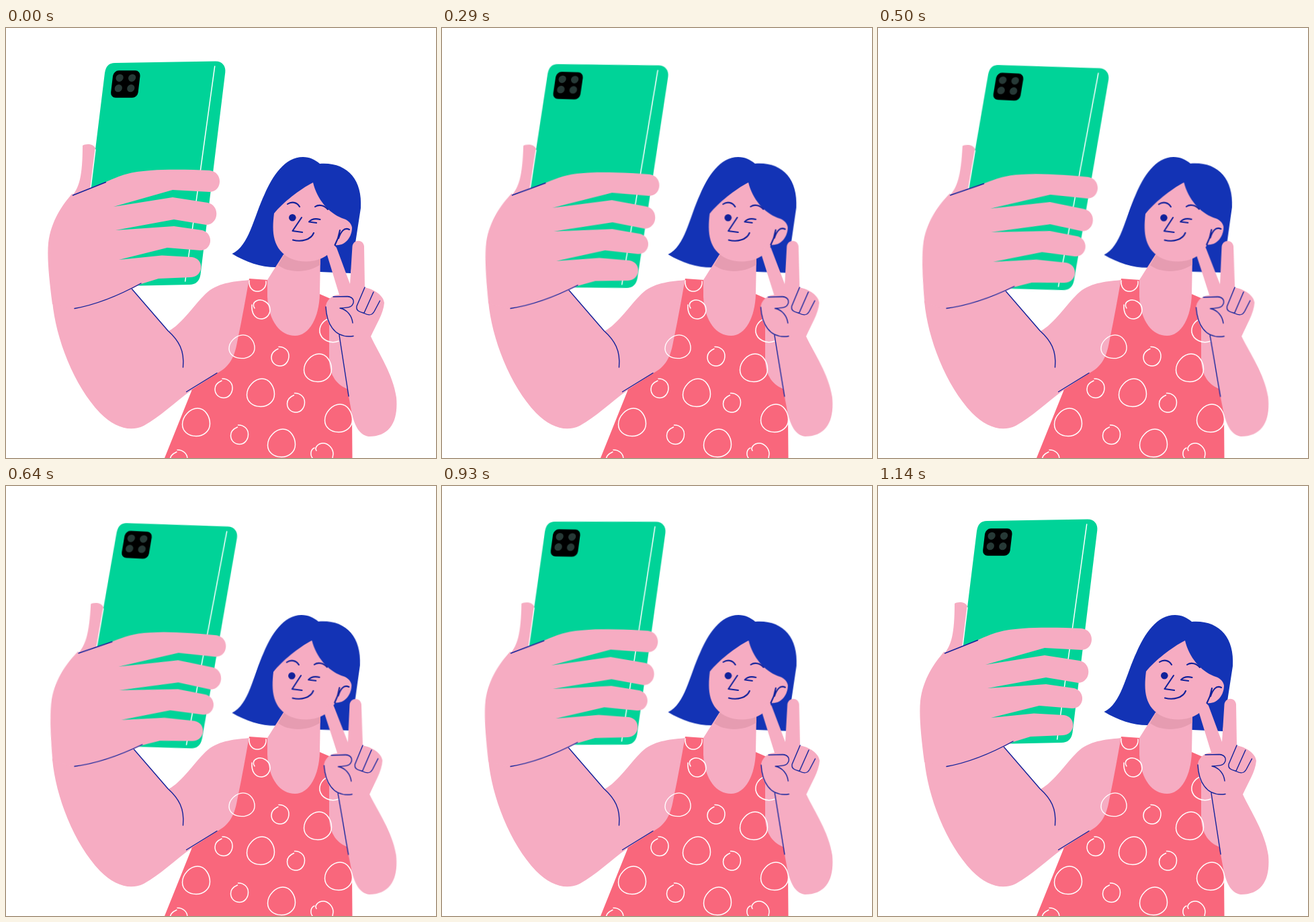
An HTML page that plays this animation: 640 by 640 pixels, repeating every 1210 ms.

```html
<!DOCTYPE html>
<html lang="en">
<head>
<meta charset="utf-8">
<title>Selfie</title>
<style>
  html, body { margin: 0; width: 100%; height: 100%; overflow: hidden; background: #fff; }
  svg { display: block; width: 100vw; height: 100vh; }
  .skin { fill: #f6acc2; }
  .hair { fill: #1333b5; }
  .dress { fill: #f9677c; }
  .green { fill: #00d398; }
  .line { fill: none; stroke: #11219a; stroke-width: 1.4; stroke-linecap: round; stroke-linejoin: round; }
  .bold { stroke-width: 2.1; }
  .white { fill: none; stroke: #fff; stroke-width: 1.5; stroke-linecap: round; }
  .grip { transform-origin: 107px 417px; }
  .head { transform-origin: 445px 345px; }
  .wave { transform-origin: 538px 572px; }
</style>
</head>
<body>
<svg viewBox="0 0 640 640">
  <defs>
    <path id="big" d="M2 -21C14 -21 20.5 -8 20.5 2C20.5 13 11 20.5 0 20.5C-12 20.5 -20.5 13 -20.5 3C-20.5 -9 -9 -21 2 -21Z"/>
    <path id="small" d="M-2 -14.5C6 -15 13 -9 13 -1C13 8 7 14 0 14C-7 14 -13 9 -13 1C-13 -5 -9 -9 -3 -11.5"/>
  </defs>

  <path class="hair head" d="M336.5 336C362 324 368 283 385 247C397 220 415 192 442 192C452 192 460 196 467 202C507 199 531 225 528 268L513 365L468 363L405 356C382 357 358 349 336.5 336Z"/>

  <!-- near arm -->
  <path class="skin" d="M69 407C74 462 101 532 140 573C161 594 184 602 205 592C230 578 250 558 275 540L320 520L372 470L364 375C343 377 318 378 300 393C281 410 262 441 242 451L187 388L150 360L80 380Z"/>
  <path class="line" d="M187 388L241 450.5C257 465 266 480 263.5 505"/>

  <!-- dress, shoulder, neck -->
  <path class="dress" d="M362 373L390 375L420 420L467 396L490 406L511 545Q515 560 515 580L515.5 640H236L277 538L314 514C333 504 340 490 344 468C352 430 357 400 362 373Z"/>
  <path class="skin" d="M481 403C492 408 500 420 508 440L514 540L510 538C493 532 482 518 481 495Z"/>
  <path class="skin" d="M413 337L389 375V400C391 438 409 458 430 458C452 458 466 430 467 396L468 338Z"/>
  <path d="M414 337L405 353C420 365 450 365 468 352V338Z" fill="#e69cb1"/>
  <path class="line" d="M268.5 541.5L314 513.5"/>
  <g class="white" id="rings">
    <path d="M362 376C361 386 367 392 374 392C382 392 388 385 387 377"/>
    <path d="M370 417C367 413 368 408 373 406C381 402 393 409 393 419C393 428 386 433 380 433C371 433 365 425 366 412"/>
    <path d="M462 629C459 625 464 618 472 618C480 618 487 626 487 634L486 640M456 640C452 634 454 627 459 625"/>
    <path d="M479 433C470 437 466 445 467 453C469 464 483 471 495 466"/>
  </g>

  <g class="head">
    <path class="skin" d="M457 230C437 240 412 260 399 276C396 300 397 317 408 331C418 343 432 348 448 347.5C470 347 484 336 490 323C505 325 515 311 515 297C514 290 508 285 500 283C480 275 463 255 457 230Z"/>
    <circle cx="426.3" cy="282.3" r="5.3" fill="#11219a"/>
    <path class="line bold" d="M419 262C425 258 433 259 437 266M460 266C466 262 474 264 479 270M467.5 285C460 283 454 285 451 288.5L462 290M440 282L426.500 302L441 304M427 315.5C440 319 454 315 458 305M511 300C503 296 498 304 495 313M497 301L494 313L489.5 323"/>
  </g>

  <!-- far arm -->
  <g class="wave">
    <path class="skin" d="M478 338C479 325 487 320 492 327L512 381L515.5 325C517 314 532 314 533 325L534 386C548 389 562 398 563 409C562 425 550 443 543 459C555 485 576 515 581 550C584 585 572 608 540 608C525 606 518 590 514 570L510 548L496 457C481 449 475 432 476 413C479 401 489 397 496 397Z"/>
    <path class="line" d="M487 400L508 399.5C515 400 518 404 517 409C515 415 513 416 497 417C508 419 515 429 516 439M476 415C477 437 487 463 517 458.5M496 457L510 548M534 386L522 414C521 420 524 422 533 424.5C541 429 545 427 548 422L556.5 406M547 393L533 424"/>
  </g>

  <!-- phone and hand -->
  <g class="grip">
    <path class="skin" d="M114 175C119 172 130 172 133 179L132 238L99 249C109 237 114 220 114 175Z"/>
    <path class="green" d="M162 52L312 49.5C322 49.5 327.5 57 326.3 66L289.5 367Q287 382 273 382L201 383.5L108 384L147 67Q149 52 162 52Z"/>
    <path class="white" d="M133 181L126 238M310.7 57L266.7 377"/>
    <g id="camera" transform="translate(160 63.3) skewX(-6.7)">
      <rect width="40.500" height="40.500" rx="8"/>
    </g>
    <path class="skin" d="M99 248L149 229C171 219 185 214 215 212C245 210 275 211 303 212C323 214 323 243 303 244L248 241L160 266L248 252L300 260C319 264 317 292 298 293L250 285L163 301L250 295L292 301C310 306 307 331 289 331L240 327L168 345L232 338.5L277 341C296 344 294 370 275 371L227 373L201 381C172 397 140 411 102 419L69 411C64 372 61 342 63 320C67 287 84 263 99 246Z"/>
    <path class="line" d="M99.5 249L148.5 229.5M102 417.5C138 411 170 397 201 380"/>
  </g>
</svg>
<script>
  const add = (parent, tag, attrs) => {
    const el = document.createElementNS('http://www.w3.org/2000/svg', tag);
    for (const name in attrs) el.setAttribute(name, attrs[name]);
    document.getElementById(parent).append(el);
  };
  const ring = (kind, x, y, shape = '') =>
    add('rings', 'use', { href: '#' + kind, transform: `translate(${x} ${y}) ${shape}` });

  // The dress print and the lenses both sit on two-by-two grids.
  for (const i of [0, 1]) for (const j of [0, 1]) {
    ring('big', 379 + 85 * i + 31 * j, 543 - 37 * i + 75 * j);
    ring('small', 408 - 84 * i + 23.5 * j, 489 + 47.5 * i + 69 * j);
    add('camera', 'circle', { cx: 10.4 + 18.5 * i, cy: 11 + 15.4 * j, r: 5.6, fill: '#273a37' });
  }
  ring('big', 283, 587);
  ring('big', 351, 474.5, 'scale(.93 .84)');
  ring('small', 257, 642.5);

  // One sway forth and back, shown in equal steps rounded to 10 ms.
  const LOOP = 1210, STEPS = 17, LAST = STEPS - 1, PEAK = 8.5;
  const startOf = i => 10 * Math.floor((i * LOOP / STEPS) / 10 + 1e-6);
  const sway = i => {
    const u = i < PEAK ? (i / PEAK) ** 0.8 : (LAST - i) / (LAST - PEAK);
    return Math.sin(u * Math.PI / 2) ** 2;
  };

  const swing = (selector, degrees) => {
    const frames = Array.from({ length: STEPS }, (_, i) => ({
      offset: startOf(i) / LOOP,
      transform: `rotate(${sway(i) * degrees}deg)`,
      easing: 'steps(1, end)'
    }));
    frames.push({ offset: 1, transform: 'rotate(0deg)' });
    document.querySelectorAll(selector).forEach(el =>
      el.animate(frames, { duration: LOOP, iterations: Infinity }));
  };

  swing('.grip', 2.93);
  swing('.head', -0.85);
  swing('.wave', -0.95);
</script>
</body>
</html>
```
